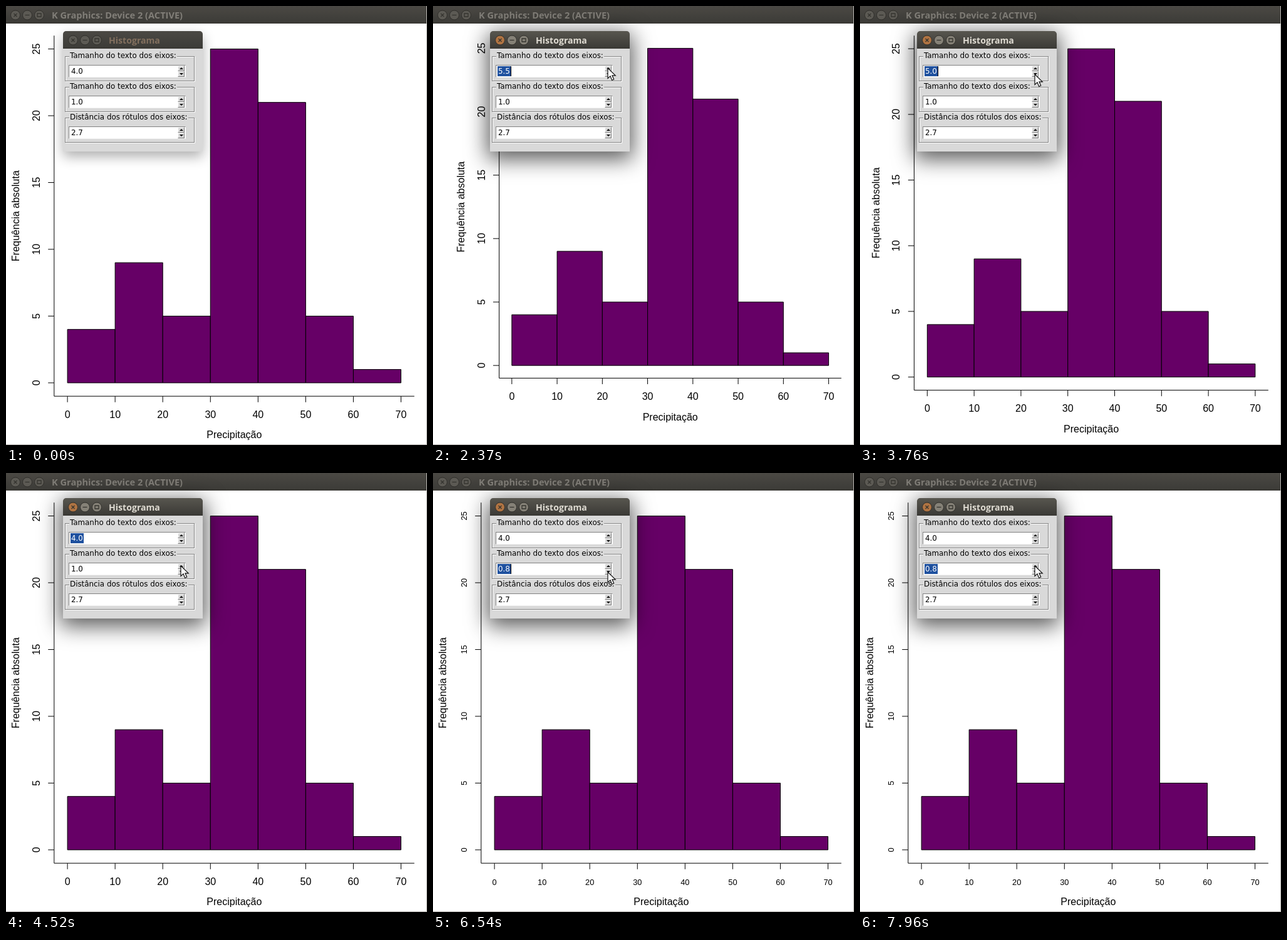
These frames come from a looping animation (672x700 px, 8000 ms). An HTML page:

```html
<!DOCTYPE html>
<html lang="pt">
<head>
<meta charset="utf-8">
<title>Histograma</title>
<style>
html, body { margin: 0; width: 100%; height: 100%; overflow: hidden; background: #fff; }
#stage { position: relative; width: 672px; height: 700px; overflow: hidden; background: #fff; }
#stage > svg { position: absolute; left: 0; top: 0; }
#plot { font: 16px "Liberation Sans", Arial, sans-serif; text-anchor: middle; }
#plot path { fill: none; stroke: #000; }
#plot .bar { fill: #606; }

.titlebar { position: absolute; left: 0; top: 0; right: 0; height: 28px; background: linear-gradient(#4b4944, #3d3c38 90%, #373632); color: #817e78; --disc: #5c5a54; --close: #5c5a54; }
#stage > .titlebar { right: 1px; }
.titlebar svg { position: absolute; left: 6px; top: 5px; }
.titlebar b { position: absolute; left: 73px; top: 0; font: bold 14.6px/29px "Open Sans", "Noto Sans", sans-serif; white-space: pre; }

#dialog { position: absolute; left: 91px; top: 40px; width: 223px; height: 192px; background: #d9d9d9; border-radius: 5px 5px 0 0; box-shadow: 0 8px 20px rgba(0,0,0,.32); }
#dialog .titlebar { border-radius: 5px 5px 0 0; color: #83705f; }
#dialog .titlebar svg { left: 7px; }
#dialog .titlebar b { font-size: 14.1px; }
#dialog.on { box-shadow: 0 8px 34px 4px rgba(0,0,0,.66); }
#dialog.on .titlebar { background: linear-gradient(#58564f, #3d3c38 90%, #373632); color: #dfdbd2; --disc: #858177; --close: #b07443; }

.group { position: absolute; left: 3px; width: 205px; height: 38px; border: 1px solid #828282; box-shadow: 1px 1px #fff, inset 1px 1px #fff; font: 11.87px/14px "DejaVu Sans", sans-serif; color: #000; }
.legend { position: absolute; left: 6px; top: -9px; padding: 0 1px; background: #d9d9d9; white-space: pre; }
.entry { position: absolute; left: 5px; top: 13px; width: 185px; height: 18px; border: 1px solid; border-color: #828282 #f4f4f4 #f4f4f4 #828282; background: #fff; }
.value { position: absolute; left: 2px; top: 1px; height: 16px; line-height: 16px; padding: 0 1px; }
.value.sel { background: #1f519f; color: #fff; }
.caret { position: absolute; left: 23px; top: 1px; width: 1px; height: 16px; background: #000; visibility: hidden; }
.spin { position: absolute; right: 1px; width: 9px; height: 7px; background: #d9d9d9; border: 1px solid; border-color: #fff #777 #777 #fff; }
.spin::after { content: ""; position: absolute; left: 1.5px; top: 2px; border: 3px solid transparent; border-top-width: 0; border-bottom: 3.5px solid #000; }
.up { top: 0; }
.down { top: 9px; }
.down::after { transform: scaleY(-1); }
#edge { position: absolute; inset: 0; border: solid #b4b2ae; border-width: 0 1px 1px 0; }
</style>
</head>
<body>
<div id="stage">
  <svg id="plot" width="672" height="700"></svg>
  <div id="edge"></div>
  <div class="titlebar"><b>K Graphics: Device 2 (ACTIVE)</b></div>
  <div id="dialog"><div class="titlebar"><b>Histograma</b></div></div>
  <svg id="pointer" width="18" height="24" viewBox="-1 -1 18 24">
    <path d="M0 0V16.5L4 12.8L6.7 19.3L9.7 18L7 11.8H12.2Z" fill="#fff" stroke="#111" stroke-width="1.2"/>
  </svg>
</div>
<script>
const LOOP = 8000, LINE = 19.2, TEXT_LAG = 30;
const counts = [4, 9, 5, 25, 21, 5, 1];
const legends = ["Tamanho do texto dos eixos:", "Tamanho do texto dos eixos:", "Distância dos rótulos dos eixos:"];
const startValues = [4, 1, 2.7], clickSizes = [.5, .1, .1];

// Runs of evenly spaced clicks on one spinner arrow
const runs = [
  { row: 0, dir: 1, start: 1880, gap: 230, n: 3 },
  { row: 0, dir: -1, start: 3510, gap: 225, n: 3 },
  { row: 1, dir: 1, start: 4830, gap: 195, n: 3 },
  { row: 1, dir: -1, start: 5790, gap: 180, n: 7 },
  { row: 1, dir: 1, start: 7720, gap: 180, n: 2 }
];

const $ = id => document.getElementById(id);
const clamp = (v, lo, hi) => Math.max(lo, Math.min(hi, v));
const mix = (a, b, k) => a + (b - a) * k;
const ease = k => k * k * (3 - 2 * k);

function valueAt(row, t) {
  const clicks = runs.filter(r => r.row === row).reduce((sum, r) =>
    sum + r.dir * clamp(Math.floor((t - r.start) / r.gap) + 1, 0, r.n), 0);
  return startValues[row] + clickSizes[row] * clicks;
}

function pointerAt(t) {
  if (t < 690 || (t >= 880 && t < 1070)) return null;
  if (t < 880) {
    const k = (t - 690) / 190;
    return [mix(65, 271, k), mix(313, 154, k)];
  }
  let x = 119, y = 130, leave = 1070, travel = 510;
  for (const r of runs) {
    const k = ease(clamp((t - leave) / travel, 0, 1));
    x = mix(x, 278, k);
    y = mix(y, 98 + 49 * r.row + (r.dir < 0 ? 10 : 0), k);
    leave = r.start + r.gap * (r.n - 1) + 150;
    travel = 280;
  }
  return [x, y];
}

function discs() {
  const disc = (x, fill, mark) => `<g transform="translate(${x} 9.5)">
    <circle r="7.5" fill="var(${fill})" stroke="#302f2b"/>
    <path d="${mark}" fill="none" stroke="#35342f" stroke-width="1.3"/></g>`;
  return `<svg width="58" height="19">${disc(9, "--close", "M-2.5-2.5L2.5 2.5M2.5-2.5L-2.5 2.5")}
    ${disc(28, "--disc", "M-3.5 0H3.5")}${disc(47, "--disc", "M-3-2.5H3V2.5H-3Z")}</svg>`;
}

function plot(mar, cex) {
  const left = LINE * mar, bottom = 699 - LINE * mar, top = 47.2, right = 651.8;
  const padX = (right - left) / 27, padY = (bottom - top) / 27;
  const px = v => mix(left + padX, right - padX, v / 70);
  const py = v => mix(bottom - padY, top + padY, v / 25);
  const label = (x, y, s, size, turn) =>
    `<text transform="translate(${x} ${y})${turn ? " rotate(-90)" : ""}" font-size="${16 * size}">${s}</text>`;
  let out = "", axes = `M${left} ${top}V${bottom}H${right}`;

  counts.forEach((n, i) => {
    out += `<path class="bar" d="M${px(i * 10)} ${py(0)}V${py(n)}H${px(i * 10 + 10)}V${py(0)}Z"/>`;
  });
  for (let v = 0; v <= 70; v += 10) {
    axes += `M${px(v)} ${bottom}v9.6`;
    out += label(px(v), bottom + 1.8 * LINE, v, cex);
  }
  for (let v = 0; v <= 25; v += 5) {
    axes += `M${left} ${py(v)}h-9.6`;
    out += label(left - 1.2 * LINE, py(v), v, cex, true);
  }
  out += label((left + right) / 2, bottom + 3.5 * LINE, "Precipitação", 1);
  out += label(left - 2.9 * LINE, (top + bottom) / 2, "Frequência absoluta", 1, true);
  $("plot").innerHTML = out + `<path d="${axes}"/>`;
}

document.querySelectorAll(".titlebar").forEach(bar => bar.insertAdjacentHTML("beforeend", discs()));
legends.forEach((name, i) =>
  $("dialog").insertAdjacentHTML("beforeend", `<div class="group" style="top:${40 + 49 * i}px">
    <span class="legend">${name}</span><div class="entry"><span class="value"></span>
    <i class="caret"></i><i class="spin up"></i><i class="spin down"></i></div></div>`));
const values = document.querySelectorAll(".value"), carets = document.querySelectorAll(".caret");

let drawn = "";
function frame(now) {
  const t = now % LOOP;
  const mar = valueAt(0, t), cex = valueAt(1, t), key = mar + "/" + cex;
  if (drawn !== key) {
    plot(mar, cex);
    drawn = key;
  }

  const run = runs.filter(r => r.start <= t).pop();
  const blinkOn = (t + 270) % 900 >= 300;
  $("dialog").className = run ? "on" : "";
  values.forEach((el, i) => {
    const active = !!run && run.row === i;
    el.textContent = valueAt(i, t - TEXT_LAG).toFixed(1);
    el.classList.toggle("sel", active);
    carets[i].style.visibility = active && blinkOn ? "visible" : "hidden";
  });

  const pos = pointerAt(t);
  $("pointer").style.visibility = pos ? "visible" : "hidden";
  if (pos) $("pointer").style.transform = `translate(${Math.round(pos[0])}px, ${Math.round(pos[1])}px)`;
  requestAnimationFrame(frame);
}
frame(performance.now());
</script>
</body>
</html>
```
